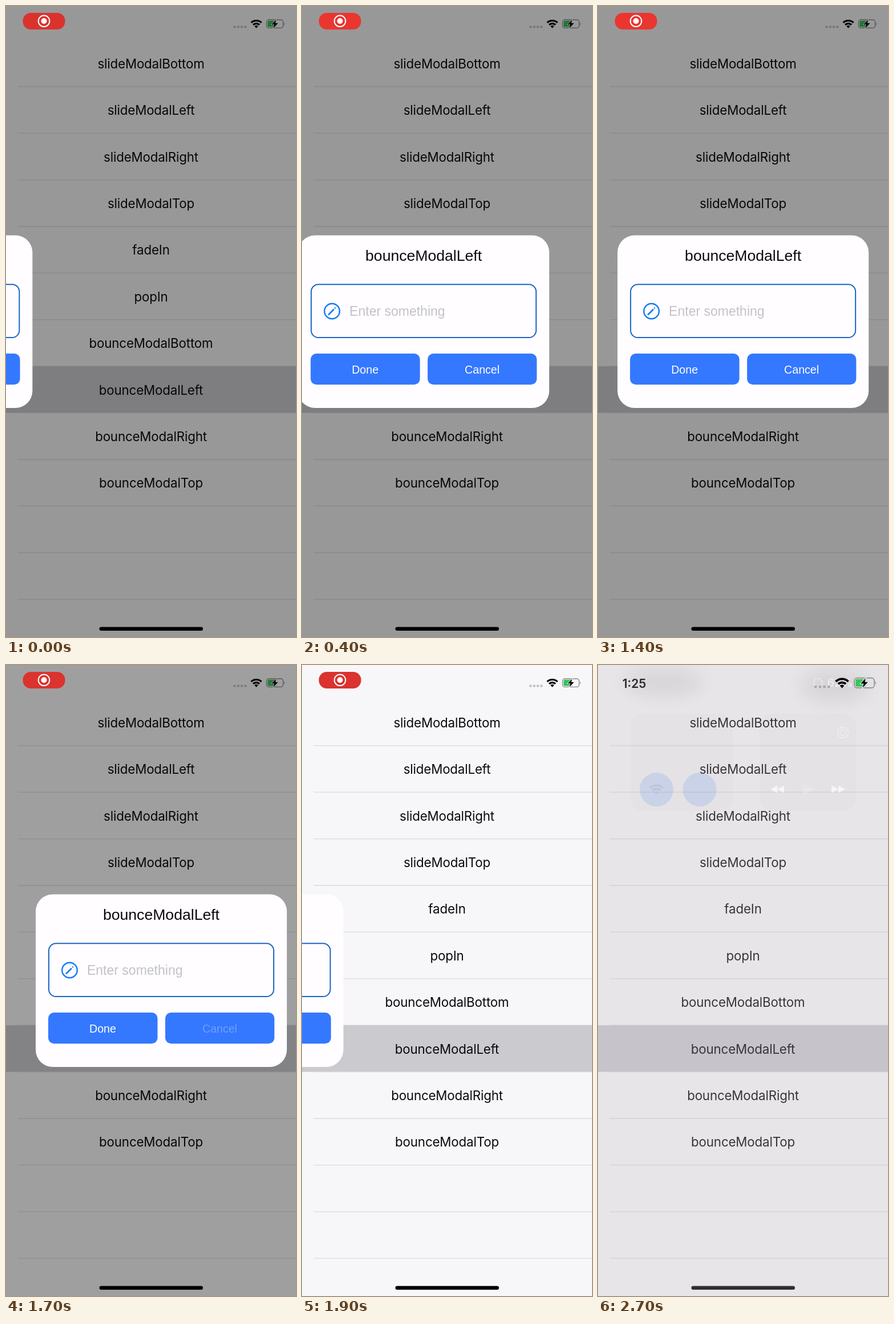
Recreate the animation shown at these times as an HTML page. Size 508 px wide and 1102 px high, loop 2.8 s.

```html
<!DOCTYPE html>
<html lang="en">
<head>
<meta charset="utf-8">
<title>Modal transitions</title>
<style>
  html, body { margin: 0; width: 100%; height: 100%; overflow: hidden; background: #fefdff; }
  svg { display: block; width: 100vw; height: 100vh; }
  text { text-anchor: middle; }
  #list text { font: 22.3px Inter, sans-serif; letter-spacing: -.15px; fill: #0a0a0c; }
  #modal text { font-family: "Liberation Sans", Arial, sans-serif; }
  .time { font: 500 20px Inter, sans-serif; }
</style>
</head>
<body>
<svg viewBox="0 0 508 1102">
  <defs>
    <g id="wifi">
      <g fill="none" stroke="currentColor" stroke-width="3.1">
        <path d="M-9 -1.8A12.8 12.8 0 0 1 9 -1.8M-5.5 1.8A8 8 0 0 1 5.5 1.8"/>
      </g>
      <path fill="currentColor" d="M0 7.7L-3.2 4.2A4.6 4.6 0 0 1 3.2 4.2Z"/>
    </g>
    <g id="battery">
      <rect x="-14.5" y="-7.2" width="29" height="14.4" rx="4" fill="none" stroke="#8f8e93" stroke-width="1.4"/>
      <path d="M16 -2.5Q18.4 0 16 2.5Z" fill="#8f8e93"/>
      <rect x="-12.7" y="-5.4" width="15" height="10.8" rx="2.2" fill="#34c759"/>
      <path d="M2 -7L-5.5 1H-1L-2.5 7L5.5 -1.2H.8Z" fill="#000" stroke="#fff" stroke-width="1.5" paint-order="stroke"/>
    </g>
    <path id="skip" d="M-12 -6.5L0 0L-12 6.5ZM0 -6.5L12 0L0 6.5Z"/>
    <filter id="soft" x="-50%" y="-50%" width="200%" height="200%"><feGaussianBlur stdDeviation="16"/></filter>
  </defs>

  <rect width="508" height="1102" fill="#fefdff"/>
  <g id="list"></g>
  <g id="status">
    <g fill="#c6c5ca">
      <circle cx="400.3" cy="36.5" r="2.3"/><circle cx="406.8" cy="36.5" r="2.3"/>
      <circle cx="413.1" cy="36.5" r="2.3"/><circle cx="419.5" cy="36.5" r="2.3"/>
    </g>
    <use href="#wifi" x="438.5" y="31"/>
    <use href="#battery" x="471" y="31.2"/>
  </g>
  <rect id="dim" width="508" height="1102"/>

  <g id="modal">
    <rect x="34" y="400.5" width="440" height="301.5" rx="30" fill="#fffdff"/>
    <text x="254" y="445" font-size="26.6" fill="#0a0a0c">bounceModalLeft</text>
    <rect x="57" y="486.3" width="394" height="92.7" rx="12.5" fill="none" stroke="#1b65c4" stroke-width="2"/>
    <g stroke="#0f7bf5" fill="none">
      <circle cx="93.5" cy="533" r="13.3" stroke-width="2.4"/>
      <path d="M87 539.5L97 529.5M98.3 528.2L99.6 526.9" stroke-width="2.6"/>
    </g>
    <text x="124" y="541" font-size="23" fill="#c3c2c7" style="text-anchor:start">Enter something</text>
    <g fill="#3478ff">
      <rect x="56" y="607" width="191.5" height="54.3" rx="10"/>
      <rect x="261" y="607" width="191.2" height="54.3" rx="10"/>
    </g>
    <g font-size="19.6" fill="#fff">
      <text x="151.5" y="641.7">Done</text>
      <text id="cancel" x="356.5" y="641.7">Cancel</text>
    </g>
  </g>

  <g id="pill">
    <rect id="pillBody" x="29.5" y="12" width="74" height="29" rx="14"/>
    <g id="record">
      <circle cx="66.5" cy="26.3" r="9.8" fill="none" stroke="#fff" stroke-width="2"/>
      <circle cx="66.5" cy="26.3" r="5" fill="#fff"/>
    </g>
    <text id="clock" class="time" x="66.7" y="33.5" fill="#fff">1:25</text>
  </g>
  <rect x="163.5" y="1084.5" width="181.5" height="6.6" rx="3.3"/>

  <g id="panel">
    <rect width="508" height="1102" fill="#a8a4ae" opacity=".28"/>
    <g filter="url(#soft)" opacity=".07">
      <ellipse cx="115" cy="30" rx="70" ry="22"/><ellipse cx="415" cy="36" rx="60" ry="28"/>
    </g>
    <g opacity=".012">
      <rect x="57" y="85" width="179" height="170" rx="22"/><rect x="283" y="85" width="169" height="170" rx="22"/>
    </g>
    <g fill="#6f9bea" opacity=".22">
      <circle cx="102.5" cy="217.5" r="29.5"/><circle cx="178" cy="217.5" r="29.5"/>
    </g>
    <use href="#wifi" transform="translate(102.5 217) scale(1.25)" color="#bcc5da"/>
    <g fill="#f6f5f8">
      <use href="#skip" transform="translate(314 217) scale(-1 1)"/>
      <use href="#skip" x="421" y="217"/>
      <path d="M359 207L379 217L359 227Z" opacity=".25"/>
    </g>
    <g fill="none" stroke="#f3f2f5" stroke-width="1.5" opacity=".7">
      <circle cx="429" cy="118" r="9.5"/><circle cx="429" cy="118" r="5"/>
      <circle cx="385.5" cy="31" r="7.5"/>
    </g>
    <text class="time" x="424" y="38" fill="#f3f2f5" opacity=".8">62%</text>
    <path d="M379 38H407" stroke="#aaa9ae" stroke-width="4" stroke-dasharray="4.5 3.2"/>
    <use href="#wifi" transform="translate(427.5 31) scale(1.22)"/>
    <use href="#battery" transform="translate(466.5 31.3) scale(1.2)"/>
    <text class="time" x="63.5" y="39.5" fill="#29282c" style="font-size:21px;font-weight:600">1:25</text>
  </g>
</svg>
<script>
const LOOP = 2800, ROW = 81.4, SELECTED = 7;
const labels = ['slideModalBottom', 'slideModalLeft', 'slideModalRight', 'slideModalTop', 'fadeIn',
  'popIn', 'bounceModalBottom', 'bounceModalLeft', 'bounceModalRight', 'bounceModalTop'];
const el = id => document.getElementById(id);
const progress = (t, from, to) => Math.min(1, Math.max(0, (t - from) / (to - from)));
const sine = u => (1 - Math.cos(Math.PI * u)) / 2;

el('list').innerHTML = Array.from({ length: 12 }, (_, i) => {
  const y = 140.8 + i * ROW;
  return (i === SELECTED ? `<rect y="${y - ROW}" width="508" height="${ROW}" fill="#d1d0d5"/>` : '') +
    `<path d="M20.5 ${y}H508" stroke="#e1e0e4" stroke-width="1.3"/>` +
    (labels[i] ? `<text x="254" y="${y - 32}">${labels[i]}</text>` : '');
}).join('');

// Underdamped spring from one screen width to the left
function springIn(t) {
  const s = t / 1000 + .0355, w = 15.7, decay = 5.87;
  return -508 * Math.exp(-decay * s) * (Math.cos(w * s) + decay / w * Math.sin(w * s));
}

function modalOffset(t) {
  if (t < 1600) return springIn(t);
  return 18 * sine(progress(t, 1600, 1700)) - 526 * sine(progress(t, 1700, 1986));
}

function draw(now) {
  const t = now % LOOP;
  const panelOpen = t >= 2700;
  el('modal').setAttribute('transform', `translate(${modalOffset(t).toFixed(2)} 0)`);
  el('dim').setAttribute('opacity', .4 * (1 - sine(progress(t, 1650, 1950))));
  el('cancel').setAttribute('opacity', t < 1500 ? 1 : .28);

  const glow = (1 - Math.cos(2 * Math.PI * t / 1800)) / 2;
  el('pillBody').setAttribute('fill', `rgb(${218 + 37 * glow},${51 + 8 * glow},${46 + 5 * glow})`);
  const swap = progress(t, 2200, 2400);
  el('record').setAttribute('opacity', 1 - swap);
  el('clock').setAttribute('opacity', swap);

  el('panel').style.display = panelOpen ? '' : 'none';
  el('pill').style.display = el('status').style.display = panelOpen ? 'none' : '';
  el('list').style.filter = panelOpen ? 'blur(.5px)' : '';
}

const start = performance.now();
function tick() {
  draw(performance.now() - start);
  requestAnimationFrame(tick);
}
tick();
</script>
</body>
</html>
```
